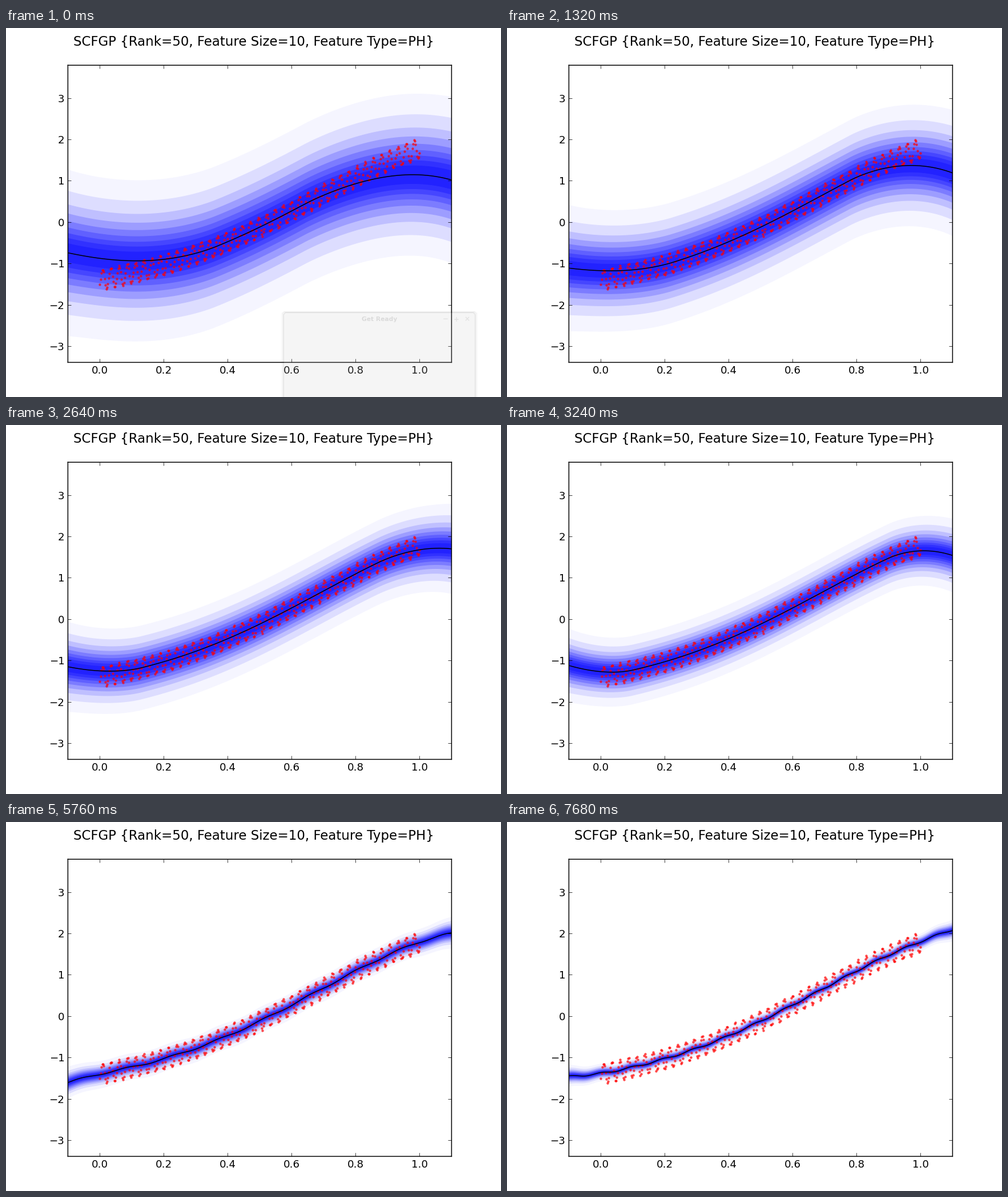
Animation of 867 by 646 pixels, one loop 8 s. Source, as a matplotlib script:

```python
import numpy as np
import matplotlib.pyplot as plt
from matplotlib.animation import FuncAnimation
from matplotlib.patches import FancyBboxPatch

W, H, DPI = 867, 646, 64
PX = 72 / DPI                 # points per pixel
TICK_MS, LOOP_MS = 40, 8000
WINDOW_MS = 120

plt.rcParams["font.family"] = "DejaVu Sans"

# Start of each training step, in units of 120 ms
STARTS = 120 * np.array([0, 6, 11, 16, 22, 27, 33, 38, 43, 48, 53, 58, 64])

# Training step, standard deviation, bend of the mean at the left and right end
KEYS = np.array([
    (0, .885, .78, -.98),
    (1, .777, .47, -.93),
    (3, .550, .35, -.69),
    (4, .465, .37, -.30),
    (5, .375, .40, -.46),
    (7, .245, .01, .01),
    (9, .145, -.08, .00),
    (10, .125, -.04, .14),
    (12, .090, .06, .09),
])

LEVELS = [0.25, 0.39, 0.52, 0.67, 0.84, 1.04, 1.28, 1.64, 2.2]

# Underlying trend: a quartic through five key points
trend = np.poly1d(np.polyfit(np.linspace(0, 1, 5),
                             [-1.39, -0.91, -0.12, 0.89, 1.79], 4))
x = np.linspace(-0.1, 1.1, 361)


def bend(dist, reach):
    return np.clip(1 - dist / reach, 0, 1) ** 1.7


def posterior(step):
    """Mean and deviation; bends shrink and ripples get finer with training."""
    sigma, left, right = (np.interp(step, KEYS[:, 0], col) for col in KEYS.T[1:])
    reach = 0.14 + 0.41 * sigma ** 2
    ripple = 0.02 * np.clip((step - 5) / 3, 0, 1)
    cycles = 7 * (step - 3) / 6
    mean = (trend(x) + left * bend(x + 0.1, reach) + right * bend(1.1 - x, reach)
            - ripple * np.sin(2 * np.pi * cycles * (x - 0.12)))
    return mean, sigma + 0.03 * ((x - 0.5) / 0.6) ** 8


CURVES = [posterior(k) for k in range(len(STARTS))]


def samples(n=400, cycles=39, rise=0.58):
    """Noisy trend with a skewed wave on top."""
    rng = np.random.default_rng(4)
    sx = np.linspace(0, 1, n)
    u = (sx * cycles + 0.2) % 1
    wave = np.where(u < rise, -np.cos(np.pi * u / rise),
                    np.cos(np.pi * (u - rise) / (1 - rise)))
    return sx, trend(sx) + 0.24 * wave + rng.normal(0, 0.012, n)


fig = plt.figure(figsize=(W / DPI, H / DPI), dpi=DPI, facecolor="white")
ax = fig.add_axes([108.4 / W, 60.6 / H, 672 / W, 520.2 / H])
ax.set_xlim(-0.1, 1.1)
ax.set_ylim(-3.39, 3.793)
ax.set_xticks(np.arange(6) * 0.2)
ax.set_yticks(range(-3, 4))
ax.set_axisbelow(False)
ax.tick_params(direction="in", top=True, right=True, length=6 * PX,
               width=0.75 * PX, pad=6 * PX, labelsize=18.2 * PX)
for spine in ax.spines.values():
    spine.set_linewidth(1.5 * PX)
    spine.set_snap(False)
fig.text(0.5, 1 - 13 / H, "SCFGP {Rank=50, Feature Size=10, Feature Type=PH}",
         ha="center", va="top", fontsize=22.83 * PX)

bands = [ax.fill([0, 1, 1], [0, 0, 1], color="blue", lw=0, zorder=1,
                 alpha=((3 - e) / 5.5) ** 1.7)[0] for e in LEVELS]
ax.plot(*samples(), "o", color="red", ms=4.4 * PX, mew=0, alpha=0.7, zorder=1.5)
mean_line, = ax.plot([], [], color="black", lw=1.5 * PX, zorder=2)


def fading_window():
    """Translucent dialog in the lower right corner."""
    top = fig.add_axes([0, 0, 1, 1], zorder=5)
    top.set_xlim(0, W)
    top.set_ylim(H, 0)
    top.axis("off")
    x0, y0, x1, y1 = 486.5, 498.5, 821.5, 670
    top.add_patch(FancyBboxPatch((x0, y0), x1 - x0, y1 - y0, lw=0,
                                 boxstyle="round,pad=0,rounding_size=4",
                                 facecolor="0.77", alpha=0.17))
    for k in range(6):
        t = y0 - min(k, 2) * 0.8
        top.plot([x0 - k, x0 - k, x0 - k + 3, x1 + k - 3, x1 + k, x1 + k],
                 [y1, t + 3, t, t, t + 3, y1],
                 color="black", lw=PX, alpha=0.09 * (1 - k / 6) ** 1.5)
    style = dict(color="0.45", ha="center", va="center", weight="bold")
    top.text(654, 510, "Get Ready", fontsize=10.6 * PX, alpha=0.2, **style)
    for i, sign in enumerate("\u2212+\u00d7"):
        top.text(769.5 + 19 * i, 510, sign, fontsize=12 * PX, alpha=0.14, **style)
    return top


window = fading_window()


def update(n):
    ms = n * TICK_MS
    mean, sigma = CURVES[np.searchsorted(STARTS, ms, side="right") - 1]
    for band, e in zip(bands, LEVELS):
        band.set_xy(np.column_stack([
            np.r_[x, x[::-1]],
            np.r_[mean + e * sigma, (mean - e * sigma)[::-1]]]))
    mean_line.set_data(x, mean)
    window.set_visible(ms < WINDOW_MS)
    return [*bands, mean_line]


anim = FuncAnimation(fig, update, frames=LOOP_MS // TICK_MS, interval=TICK_MS,
                     repeat=True, repeat_delay=0)
plt.show()
```
